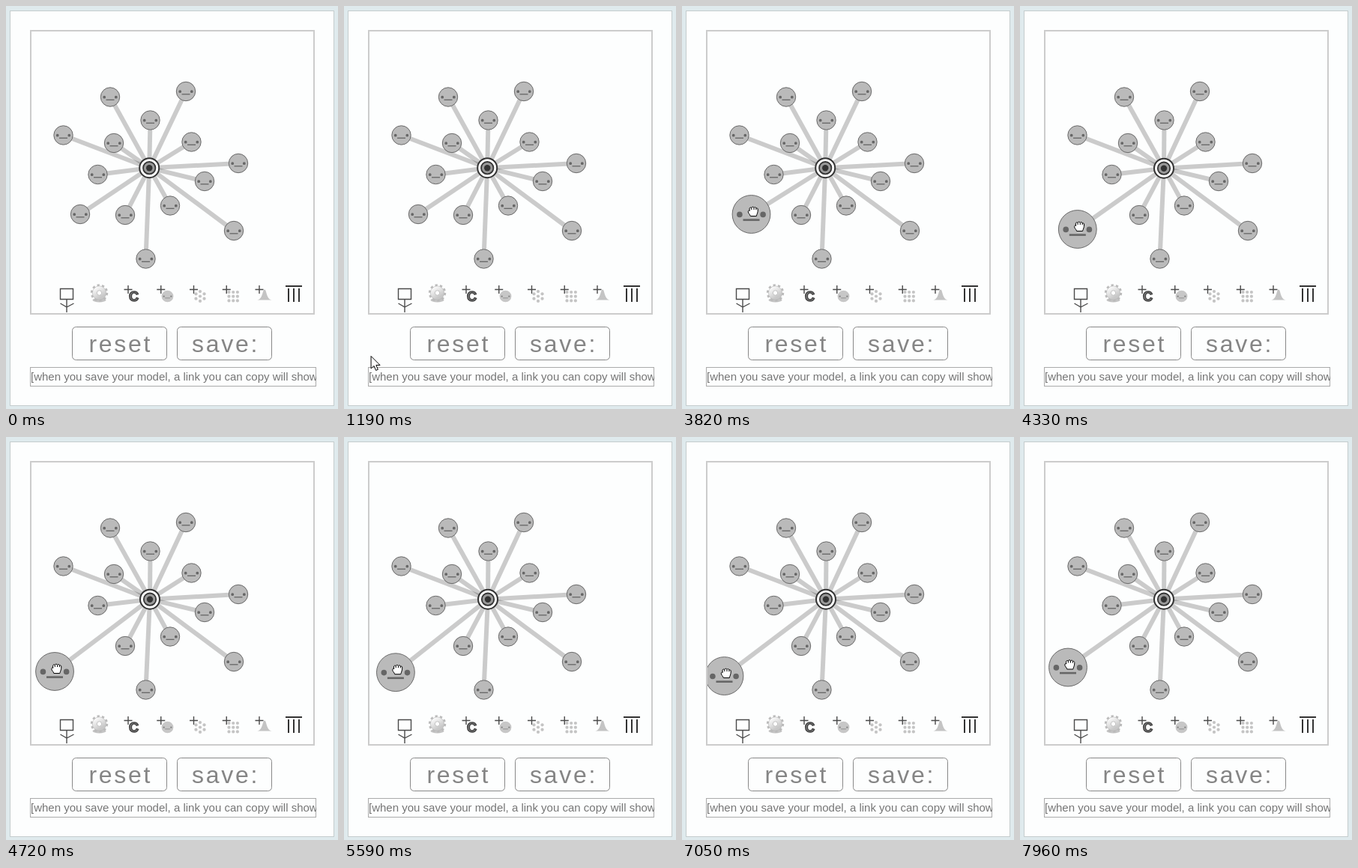
An HTML page that plays this animation: 443x538 px, repeating every 8000 ms.

```html
<!DOCTYPE html>
<html lang="en">
<head>
<meta charset="utf-8">
<title>Network sketch</title>
<style>
  html, body { margin: 0; width: 100%; height: 100%; overflow: hidden; background: #dfeaed; }
  svg { display: block; width: 443px; height: 538px; font-family: "Liberation Sans", Arial, sans-serif; }
  .button { fill: none; stroke: #888; }
  .label { font-size: 32px; letter-spacing: 2.7px; fill: #858585; }
  .line { fill: none; stroke: #4a4a4a; stroke-width: 1.4; }
  .cursor { fill: #fff; stroke: #000; stroke-linejoin: round; }
</style>
</head>
<body>
<svg viewBox="0 0 443 538">
  <defs>
    <g id="face">
      <circle r="12.7" fill="#bababa" vector-effect="non-scaling-stroke"/>
      <path d="M-7.8 .2h0M7.8 .2h0" stroke="#666" stroke-width="3.8" stroke-linecap="round"/>
      <path d="M-5.5 3.8H5.5" stroke="#666" stroke-width="1.3"/>
    </g>
    <path id="plus" class="line" d="M-5.5 0H5.5M0-5.5V5.5"/>
    <linearGradient id="metal" x2=".6" y2="1">
      <stop stop-color="#fafafa"/><stop offset="1" stop-color="#c8c8c8"/>
    </linearGradient>
    <clipPath id="board"><rect x="34" y="34" width="376" height="376"/></clipPath>
    <clipPath id="field"><rect x="33" y="483" width="381" height="25"/></clipPath>
  </defs>

  <rect x="5.5" y="6.5" width="432" height="527" fill="#fdfefe" stroke="#c4cccd"/>
  <rect x="33" y="33" width="378" height="378" fill="none" stroke="#ccc" stroke-width="2"/>

  <g id="tools" fill="#c4c4c4">
    <path class="line" d="M72.500 377.500H89.500V391.500H72.500ZM81 391.500V409M72.500 397L81 402L90.500 397"/>
    <ellipse cx="124.500" cy="392.500" rx="9" ry="3"/>
    <g fill="none" transform="translate(124.500 383)">
      <circle r="10" stroke="#bbb" stroke-width="3.4" stroke-dasharray="3.14"/>
      <circle r="6.2" stroke="url(#metal)" stroke-width="6"/>
      <circle r="9.2" stroke="#b4b4b4" stroke-width=".6"/>
      <circle r="3.2" fill="#fff" stroke="#b4b4b4" stroke-width=".8"/>
    </g>
    <text x="164" y="394" font-size="18" font-weight="bold" fill="#888" stroke="#444" stroke-width="1.5">C</text>
    <use href="#face" transform="translate(215.500 387.500) scale(.62)" opacity=".8"/>
    <path d="M335 392.500C343 392 342 378.500 345 378.500S347 392 355 392.500Z"/>
    <path d="M373 374H395M377 377V395M384 377V395M391 377V395" stroke="#333" stroke-width="2"/>
  </g>

  <rect class="button" x="88.5" y="428.5" width="126" height="44" rx="5"/>
  <rect class="button" x="228.5" y="428.5" width="126" height="44" rx="5"/>
  <text class="label" x="110.500" y="462">reset</text>
  <text class="label" x="248" y="462">save:</text>
  <rect x="32.5" y="482.5" width="381" height="25" fill="none" stroke="#aaa"/>
  <text x="33" y="500" font-size="15" fill="#757575" clip-path="url(#field)">[when you save your model, a link you can copy will show up here]</text>

  <g clip-path="url(#board)">
    <g id="links" stroke="#000" stroke-opacity=".2" stroke-width="6"></g>
    <g id="faces" stroke="#6a6a6a"></g>
    <g id="hub" stroke="#333">
      <circle r="13" fill="#fff" stroke-width="2"/>
      <circle r="8.2" fill="#999" stroke-width="1.8"/>
      <circle r="4.2" fill="#333" stroke="none"/>
    </g>
  </g>

  <path id="arrow" class="cursor" d="M.5 .5V17L4.500 13.500L7 19.500L9.800 18.300L7.300 12.500H12.500Z"/>
  <path id="open" class="cursor" d="M-3 8.500C-4 5-8.500 1.500-8.500-.5C-8.500-2.200-6.200-2-4.500.5L-6.300-5C-6.600-7-4.200-7.400-3.500-5.500L-2.200-1.500L-2.300-7C-2.300-8.900.2-8.900.4-7L.8-2L2.200-6.800C2.600-8.300 4.800-8 4.600-6L3.900-1.200L5.800-4.200C6.700-5.500 8.500-4.800 7.900-3C6.700 0 6.200 4 4.500 8.500Z"/>
  <path id="closed" class="cursor" d="M-3.500 6.500C-4 4-6.500 3-6.500.5C-6.500-1.200-5-1.200-4.500-.5L-4.800-3.200C-4.800-5.200-2.600-5.600-2-4.400C-1.400-6.400.8-6.200 1.200-4.600C1.800-6 4-5.600 4.100-3.800C5-4.800 6.600-4 6.500-2C6.500 2 5 4 4.500 6.500ZM-2-4.400V-2M1.200-4.600V-2M4.100-3.800V-1.800"/>
</svg>

<script>
const LOOP = 8000, ENTER = 920, HOVER = 1600, GRAB = 3070;
const STEP = 129.5, PHASE = 3808; // the pointer is sampled at this interval

const nodes = [
  [99, 278], [139, 121.5], [240, 114], [76.5, 172.5], [192.5, 152.5], [144, 183], [247.5, 181.5],
  [310, 210], [122.5, 225], [265, 234], [219, 266.5], [159, 279], [304, 300], [186.5, 337.5]
];

// key points: time, x, y
const approach = [
  [ENTER, 0, 530], [1190, 57, 429], [1460, 80, 344], [HOVER, 103, 274], [1730, 96, 289], [1990, 100.5, 272]
];
const drag = [
  [3680, 99, 278], [3808, 92.5, 278], [4715, 65, 313], [4960, 56, 325], [5235, 56, 325],
  [6268, 108, 281.5], [6530, 108, 281.5], [7045, 56.5, 319], [7307, 47, 335], [7440, 47, 335], [7950, 64, 307.5]
];

const $ = id => document.getElementById(id);

function add(parent, tag, attrs = {}) {
  const el = document.createElementNS("http://www.w3.org/2000/svg", tag);
  for (const k in attrs) el.setAttribute(k, attrs[k]);
  return $(parent).appendChild(el);
}
function place(el, [x, y], scale = 1) {
  el.setAttribute("transform", `translate(${x} ${y}) scale(${scale})`);
}
const dot = (cx, cy) => add("tools", "circle", { cx, cy, r: 2.1 });

const links = nodes.map(() => add("links", "line"));
const faces = nodes.map(p => {
  const face = add("faces", "use", { href: "#face" });
  place(face, p);
  return face;
});
$("faces").append(faces[0]);

for (let i = 0; i < 5; i++) add("tools", "use", { href: "#plus", x: 163 + 43.75 * i, y: 378.5 });
for (let i = 0; i < 9; i++) dot(297.5 + 5.7 * (i % 3), 382 + 5.7 * Math.floor(i / 3));
dot(259, 387.5);
for (let a = Math.PI / 6; a < 6.5; a += Math.PI / 3) dot(259 + 6.4 * Math.cos(a), 387.5 + 6.4 * Math.sin(a));

// linear position along key points, clamped at both ends
function along(keys, t) {
  const i = keys.findIndex(k => k[0] > t);
  if (i < 1) return keys.at(i).slice(1);
  const [t0, x0, y0] = keys[i - 1], [t1, x1, y1] = keys[i];
  const u = (t - t0) / (t1 - t0);
  return [x0 + (x1 - x0) * u, y0 + (y1 - y0) * u];
}

function draw(t) {
  const held = t >= GRAB;
  const sampled = PHASE + Math.floor((t - PHASE) / STEP) * STEP;
  const pos = along(drag, sampled);
  const hub = t < 4330 ? [191.2, 216.2] : [192, 216.7];

  place($("hub"), hub);
  place(faces[0], pos, held ? 2 : 1);
  links.forEach((link, i) => {
    const [x2, y2] = i ? nodes[i] : pos;
    const ends = { x1: hub[0], y1: hub[1], x2, y2 };
    for (const k in ends) link.setAttribute(k, ends[k]);
  });

  const kind = held ? "closed" : t >= HOVER ? "open" : t >= ENTER ? "arrow" : "";
  for (const id of ["arrow", "open", "closed"]) $(id).style.display = id === kind ? "" : "none";
  if (kind) place($(kind), held ? [pos[0] + 2.3, pos[1] - 4] : along(approach, sampled));
}

const start = performance.now();
function tick() {
  draw((performance.now() - start) % LOOP);
  requestAnimationFrame(tick);
}
tick();
</script>
</body>
</html>
```
